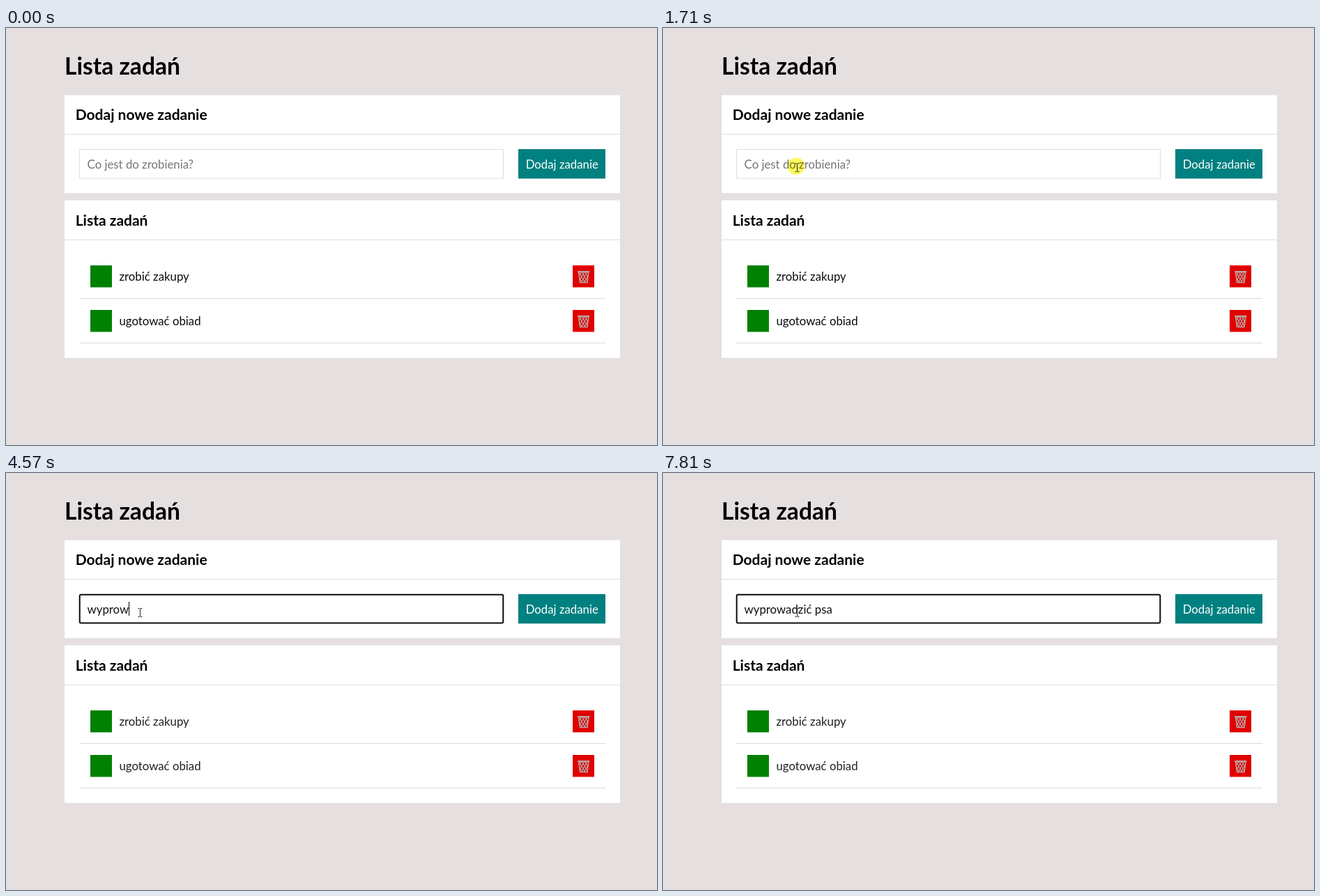
Recreate the animation shown at these times as an HTML page. Size 934x599 px, loop 8 s.

```html
<!DOCTYPE html>
<html lang="pl">
<head>
<meta charset="utf-8">
<title>Lista zadań</title>
<style>
  html, body { margin: 0; width: 100%; height: 100%; overflow: hidden; background: #e5dfdf; }
  svg { display: block; font: 16.8px Lato, sans-serif; }
  h1, .h1 { font-size: 33.6px; font-weight: 700; }
  .h2 { font-size: 21px; font-weight: 700; }
  .panel { fill: #fff; }
  .rule { fill: #ddd; }
  .field { fill: #fff; stroke: #ddd; }
  .field.focus { stroke: #0c0c0c; stroke-width: 2; }
</style>
</head>
<body>
<svg width="934" height="599" viewBox="0 0 934 599">
  <defs>
    <clipPath id="binShape"><path d="M821.5 351H836L834.2 366H823.3Z"/></clipPath>
    <g id="row">
      <rect x="121" y="341" width="31" height="31.5" fill="#008000"/>
      <rect x="813" y="341" width="31" height="31.5" fill="#e00000"/>
      <g fill="none" stroke="#b5aaa8">
        <path d="M820.3 350H837.2" stroke-width="2"/>
        <path d="M821.6 351L823.5 365.5H834L835.9 351" stroke-width="1.4"/>
        <path id="mesh" clip-path="url(#binShape)" stroke-width="1.1"/>
      </g>
      <rect class="rule" x="105" y="388" width="755" height="1.1"/>
    </g>
  </defs>

  <text class="h1" x="84" y="67.2">Lista zadań</text>

  <rect class="panel" x="84" y="96.5" width="797" height="140.7"/>
  <rect class="rule" x="84" y="152.2" width="797" height="1"/>
  <text class="h2" x="99.7" y="132">Dodaj nowe zadanie</text>
  <rect class="field" id="field"/>
  <text id="entry" x="116.6" y="201.6" xml:space="preserve"></text>
  <rect id="caret" y="185" width="1" height="20"/>
  <rect x="735" y="174" width="125" height="42.3" fill="#008080"/>
  <text x="745.7" y="201.6" fill="#fff">Dodaj zadanie</text>

  <rect class="panel" x="84" y="247.5" width="797" height="226.5"/>
  <rect class="rule" x="84" y="303.7" width="797" height="1"/>
  <text class="h2" x="99.7" y="283.6">Lista zadań</text>
  <use href="#row"/>
  <use href="#row" y="64"/>
  <g id="tasks">
    <text x="162.5" y="363.2">zrobić zakupy</text>
    <text x="162.5" y="427.2">ugotować obiad</text>
  </g>

  <circle id="click" cx="191" cy="198.5" r="12.3" fill="#fffa60" style="mix-blend-mode:multiply"/>
  <path id="arrow" d="M.5 .5V13.6L3.5 10.8L5.6 15.6L7.7 14.7L5.6 10H9.8Z" fill="#fff" stroke="#222"/>
  <path id="beam" d="M-3 -6H-1L0 -5.3L1 -6H3M0 -5.3V5.3M-3 6H-1L0 5.3L1 6H3" fill="none" stroke="#222"/>
</svg>
<script>
const LOOP = 8000, ENTER = 810, STEP = 70, PRESS = 1650, FOCUS = 1780, RELEASE = 1840, BLINK = 530;
const PHRASE = "wyprowadzić psa";
const KEY_TIMES = [3100, 3290, 3820, 4170, 4300, 4570, 4840, 5100, 5230, 5430, 5890, 6220, 6750, 7080, 7280];
// Pointer path: [step, x, y]
const PATH = [[0, 737, 588], [2, 455, 460], [4, 268, 351], [6, 200, 274], [8, 177, 222], [9, 178, 206], [11, 192.5, 200.5]];

const el = id => document.getElementById(id);
const show = (node, on) => node.setAttribute("visibility", on ? "visible" : "hidden");
const setAttrs = (node, attrs) => Object.entries(attrs).forEach(([k, v]) => node.setAttribute(k, v));
const [field, entry, caret, tasks, click, arrow, beam] =
  ["field", "entry", "caret", "tasks", "click", "arrow", "beam"].map(el);

let mesh = "";
for (let x = 805; x < 855; x += 4.2) mesh += `M${x} 350l10 17M${x} 350l-10 17`;
el("mesh").setAttribute("d", mesh);

function pointerAt(time) {
  const step = Math.min(11, Math.floor((time - ENTER) / STEP));
  const next = Math.max(1, PATH.findIndex(p => p[0] >= step));
  const [s0, x0, y0] = PATH[next - 1], [s1, x1, y1] = PATH[next];
  const k = (step - s0) / (s1 - s0);
  return [x0 + (x1 - x0) * k, y0 + (y1 - y0) * k];
}

function drawField(time) {
  const focused = time >= FOCUS;
  const typed = KEY_TIMES.filter(key => key <= time).length;
  field.classList.toggle("focus", focused);
  setAttrs(field, focused
    ? { x: 105.7, y: 174.7, width: 607.6, height: 40.8, rx: 2 }
    : { x: 105.5, y: 174.5, width: 608, height: 41.5, rx: 0 });
  const text = typed ? PHRASE.slice(0, typed) : "Co jest do zrobienia?";
  if (entry.textContent !== text) entry.textContent = text;
  entry.setAttribute("fill", typed ? "#111" : "#757575");
  tasks.setAttribute("fill", focused ? "#222" : "#0c0c0c");

  const lastInput = typed ? KEY_TIMES[typed - 1] : FOCUS - 10;
  show(caret, focused && Math.floor((time - lastInput) / BLINK) % 2 === 0);
  caret.setAttribute("x", Math.floor(117 + (typed ? entry.getComputedTextLength() : 0)));
}

function drawPointer(time) {
  const [x, y] = pointerAt(Math.max(time, ENTER));
  const overField = y > 174 && y < 216;
  for (const shape of [arrow, beam]) shape.setAttribute("transform", `translate(${x} ${y})`);
  show(arrow, time >= ENTER && !overField);
  show(beam, time >= ENTER && overField);
  show(click, time >= PRESS && time < RELEASE);
}

const start = performance.now();
function frame() {
  const time = (performance.now() - start) % LOOP;
  drawField(time);
  drawPointer(time);
  requestAnimationFrame(frame);
}
frame();
</script>
</body>
</html>
```
